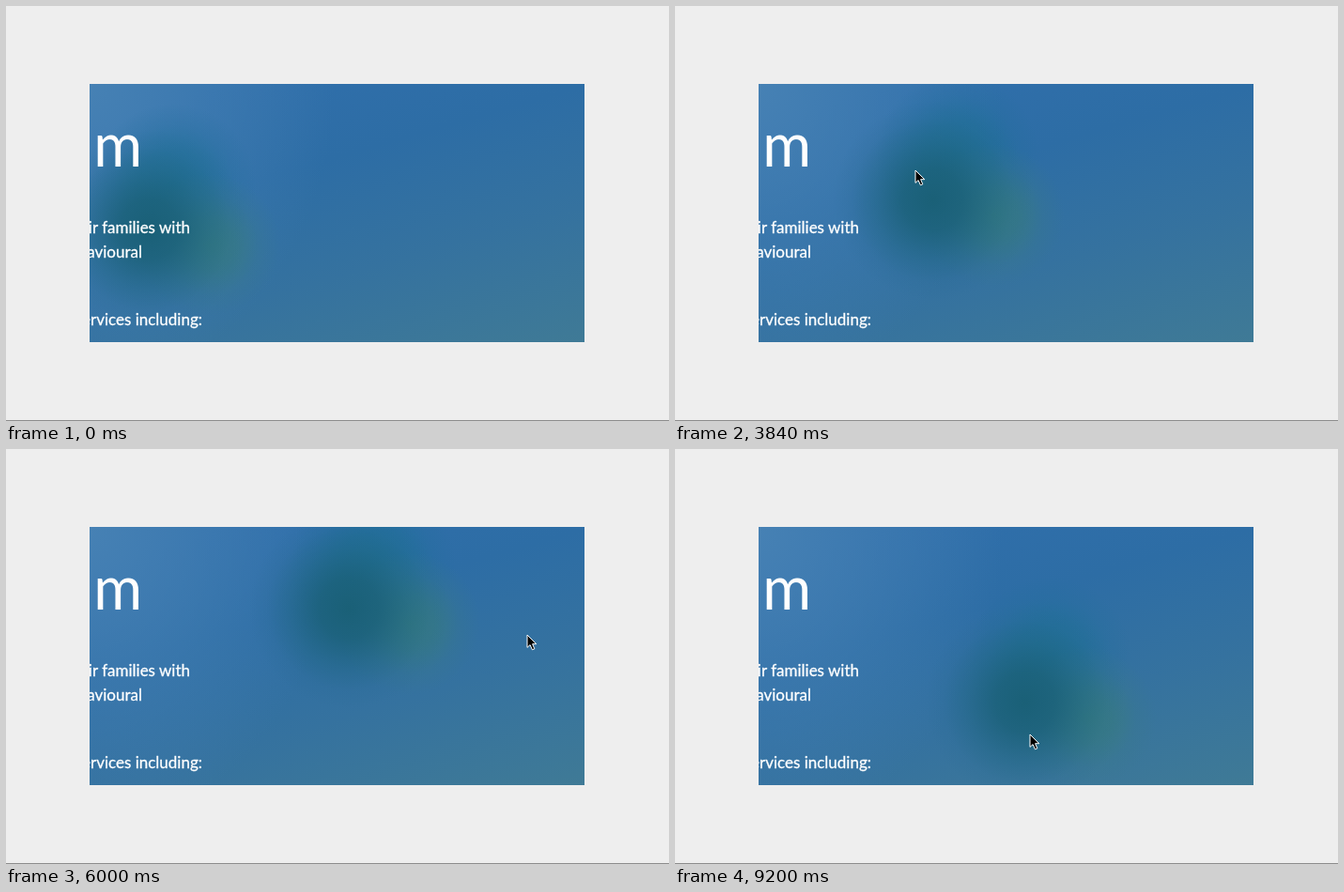
Write an HTML page that moves like this. It is 706 px wide and 442 px high and loops after 9280 ms.

```html
<!DOCTYPE html>
<html lang="en">
<head>
<meta charset="utf-8">
<title>Pointer glow</title>
<style>
  html, body { margin: 0; width: 100%; height: 100%; overflow: hidden; background: #eee; }
  .stage { position: relative; width: 706px; height: 442px; overflow: hidden; }
  .stage::after { content: ""; position: absolute; left: 0; right: 0; bottom: 0; height: 1px; background: #8c8c8c; }
  .card {
    position: absolute; left: 89px; top: 83px; width: 527px; height: 275px; overflow: hidden;
    background:
      radial-gradient(ellipse 260px 320px at 0 0, #4681b4, #3a74ae00),
      linear-gradient(164deg, #306fab 10%, #2d6da5 36%, #35729f 66%, #3f7a96);
  }
  .glow {
    position: absolute; left: -140px; top: -140px; width: 280px; height: 280px;
    background:
      radial-gradient(circle 106px at 140px 140px, #1a6077, #1b6179d8 30%, #20668480 60%, #27699130 82%, #2c6c9c00),
      radial-gradient(circle 76px at 204px 156px, #387e79d8, #387d7aa0 35%, #38798848 70%, #36749700),
      radial-gradient(circle 88px at 166px 94px, #1d6f94e8, #1d6f96a8 42%, #226e9c48 74%, #2a6da500);
  }
  .card p {
    position: absolute; margin: 0; white-space: nowrap; color: #fff;
    font: 17px/26px Lato, "Open Sans", sans-serif;
    -webkit-text-stroke: 0.3px #fff;
  }
  .card .title { font-size: 63px; line-height: 80px; -webkit-text-stroke: 0; }
  svg { position: absolute; left: 0; top: 0; overflow: visible; }
</style>
</head>
<body>
<div class="stage">
  <div class="card">
    <div class="glow" id="glow"></div>
    <p class="title" style="right:471px; top:24px">m</p>
    <p style="right:420px; top:140px">their families with</p>
    <p style="right:471px; top:166px">behavioural</p>
    <p style="right:407px; top:238px">services including:</p>
  </div>
  <svg id="pointer" width="1" height="1">
    <defs><path id="ibar" d="M-2.5-6.5Q0-6.5 0-4.5Q0-6.5 2.5-6.5M0-4.5V5M-2.5 7Q0 7 0 5Q0 7 2.5 7M-1.5 2H1.5"/></defs>
    <path id="arrow" d="M0 0V13.4L3.1 10.6 5.4 15.8 7.8 14.8 5.6 9.7H9.8Z"
          fill="#000" stroke="#fff" stroke-linejoin="round"/>
    <g id="beam" fill="none" stroke-linecap="square">
      <use href="#ibar" stroke="#fff" stroke-width="2.8"/>
      <use href="#ibar" stroke="#111" stroke-width="1.1"/>
    </g>
  </svg>
</div>
<script>
  const LOOP = 9280, STEP = 80, TEXT_EDGE = 200;
  const CARD = { x: 89, y: 83 };

  // Key points: time in ms, x, y
  const glowPath = [
    [0, 152, 238], [1200, 148, 278], [2880, 303, 218], [4640, 253, 200],
    [6000, 365, 170], [6900, 412, 212], [7920, 388, 257], [9200, 373, 270]
  ];
  const pointerPath = [
    [1360, 300, 214], [1520, 367, 205], [2880, 407, 248],
    [4640, 141, 120], [6000, 555, 198], [7600, 378, 304]
  ];

  const byId = id => document.getElementById(id);
  const glow = byId("glow"), pointer = byId("pointer"), arrow = byId("arrow"), beam = byId("beam");

  // Tangent at a key point; flat at ends and turning points
  function slope(path, i, axis) {
    const a = path[i - 1], b = path[i], c = path[i + 1];
    if (!a || !c || (b[axis] - a[axis]) * (c[axis] - b[axis]) <= 0) return 0;
    return (c[axis] - a[axis]) / (c[0] - a[0]);
  }

  // Cubic Hermite curve through the key points
  function along(path, time) {
    const t = Math.min(Math.max(time, path[0][0]), path.at(-1)[0]);
    let i = 0;
    while (i < path.length - 2 && t >= path[i + 1][0]) i++;
    const a = path[i], b = path[i + 1], span = b[0] - a[0], u = (t - a[0]) / span;
    const ease = u * u * (3 - 2 * u);
    return [1, 2].map(axis =>
      a[axis] + (b[axis] - a[axis]) * ease +
      span * u * (1 - u) * ((1 - u) * slope(path, i, axis) - u * slope(path, i + 1, axis)));
  }

  function draw(time) {
    const [gx, gy] = along(glowPath, time);
    glow.style.transform = `translate(${gx - CARD.x}px, ${gy - CARD.y}px)`;

    const [px, py] = along(pointerPath, time).map(Math.round);
    const overText = px < TEXT_EDGE;
    pointer.style.visibility = time < pointerPath[0][0] ? "hidden" : "visible";
    pointer.style.transform = `translate(${px}px, ${py}px)`;
    arrow.style.display = overText ? "none" : "";
    beam.style.display = overText ? "" : "none";
  }

  const start = performance.now();
  function tick() {
    const time = (performance.now() - start) % LOOP;
    draw(Math.floor(time / STEP) * STEP);
    requestAnimationFrame(tick);
  }
  tick();
</script>
</body>
</html>
```
